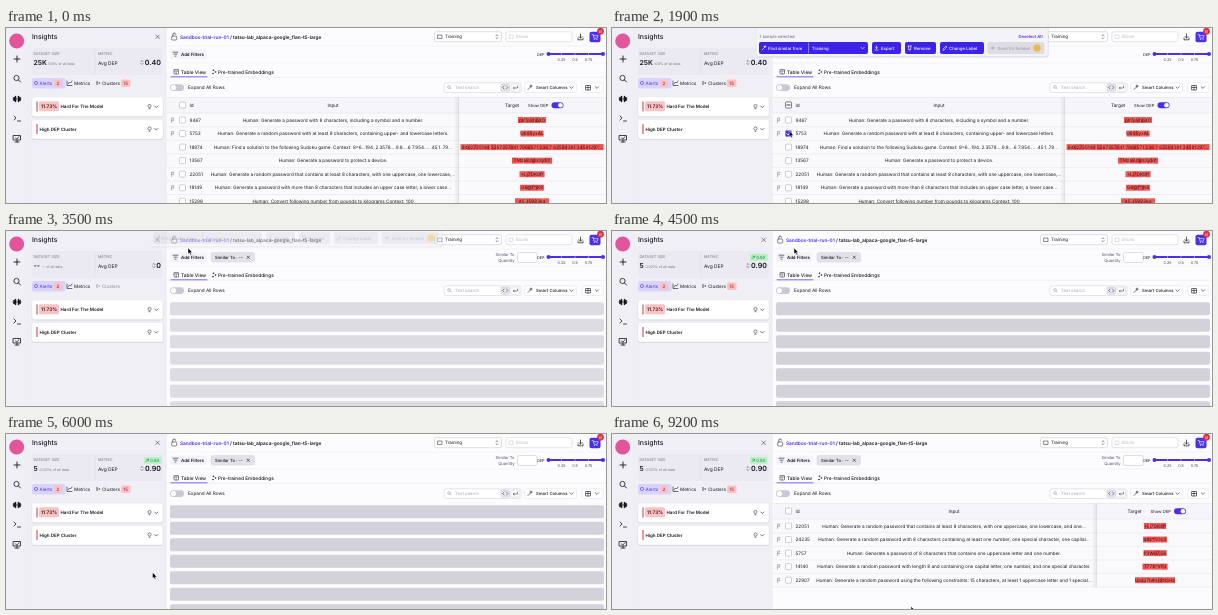
Animation of 600 by 175 pixels, one loop 9300 ms. Source, as an HTML page:

```html
<!DOCTYPE html>
<html lang="en">
<head>
<meta charset="utf-8">
<title>Insights</title>
<style>
html, body { margin: 0; width: 100%; height: 100%; overflow: hidden; background: #fff; }
svg { display: block; width: 600px; height: 175px; font-family: Inter, "Open Sans", sans-serif; text-rendering: geometricPrecision; }
text { white-space: pre; }
#toolbar { --action: #3d22ea; --on: #fff; --link: #4a36e8; }
#toolbar.busy { --action: #dddce4; --on: #a09faa; --link: #a09faa; }
</style>
</head>
<body>
<svg id="stage" viewBox="0 0 600 175"></svg>
<script>
const LOOP = 9300;
const INK = '#17171f', PURPLE = '#4a30ea', GREY = '#8b8a96', LINE = '#dddce4', PINK = '#f9c3c6';
const PANEL = '#f1eff6', PAGE = '#fcfbfe';

const rect = (x, y, w, h, fill, r = 0, stroke = 'none') =>
  `<rect x="${x}" y="${y}" width="${w}" height="${h}" rx="${r}" fill="${fill}" stroke="${stroke}" stroke-width=".5"/>`;
const circle = (x, y, r, fill, extra = '') => `<circle cx="${x}" cy="${y}" r="${r}" fill="${fill}" ${extra}/>`;
const path = (d, color = INK, w = .7, fill = 'none') =>
  `<path d="${d}" stroke="${color}" stroke-width="${w}" fill="${fill}" stroke-linecap="round" stroke-linejoin="round"/>`;
const text = (x, y, s, size = 4.65, fill = INK, weight = 400, anchor = 'start') =>
  `<text x="${x}" y="${y}" font-size="${size}" fill="${fill}" font-weight="${weight}" text-anchor="${anchor}">${s}</text>`;
const mid = (x, y, s, size, fill, weight) => text(x, y, s, size, fill, weight, 'middle');
const group = (id, body) => `<g id="${id}">${body}</g>`;
const chevron = (x, y) => path(`M${x - 1.6} ${y - .8}l1.6 1.6l1.6-1.6`, INK, .6);
const sorter = (x, y) => path(`M${x - 1} ${y - 1}l1-1l1 1M${x - 1} ${y + 1}l1 1l1-1`, INK, .5);
const toggle = (x, y, on) => rect(x, y, 12, 6, on ? PURPLE : '#cfced8', 3) + circle(x + (on ? 9 : 3), y + 3, 2.3, '#fff');
const checkbox = (x, y) => rect(x - 3, y - 3, 6, 6, '#fff', 1, '#9f9eac');

function sidebar() {
  return rect(0, 0, 22, 175, PANEL) + path('M22.5 0V175', '#dcdbe3', .5) +
    circle(10.7, 13, 7.5, '#e2559b') +
    path('M11 28v6M8 31h6', INK, .9) +
    circle(10.5, 50, 2.6, 'none', `stroke="${INK}" stroke-width=".8"`) + path('M12.5 52l2 2', INK, .9) +
    path('M9.5 68.5v5M12.5 68.5v5M8 69.5v3M14 69.5v3', INK, 1.5) + path('M7 71h8', INK, .8) +
    path('M8 88l2 2l-2 2M11.5 93h3', INK, .8) +
    path('M7.5 107.5h7v4.5h-7zM9 114h4M11 112v2M9.5 110l1.3 1l2.2-2.3', INK, .8);
}

function card(y, title, x) {
  return rect(25.7, y + .9, 131.6, 19.5, '#d9d7e1', 2) + rect(26, y, 131, 19.5, '#fff', 2, '#e4e3ea') +
    rect(30.5, y + 4.5, 1, 10, '#d3323c') +
    text(x, y + 11.4, title, 4.5, INK, 600) +
    circle(143.5, y + 9, 1.6, 'none', `stroke="${INK}" stroke-width=".5"`) +
    path(`M143 ${y + 11.7}h1`, INK, .6) + chevron(150.3, y + 9.8);
}

function insights() {
  return rect(23, 0, 137, 175, PANEL) + path('M160.2 0V175', '#dcdbe3', .5) +
    text(26, 11.4, 'Insights', 6.8, INK, 500) +
    path('M149.8 7l3.6 3.6M153.4 7l-3.6 3.6', INK, .5) +
    rect(26, 20, 131, 27, '#ebe9f1', 2) + path('M89 21V46', '#d9d7e1', .5) +
    text(27.5, 27.3, 'DATASET SIZE', 3.8, '#777683') + text(92, 27.3, 'METRIC', 3.8, '#777683') +
    text(92, 37, 'Avg DEP', 4.9) +
    rect(26, 50, 33.5, 10.5, '#d8d4fb', 2) + circle(30, 55, 1.6, 'none', `stroke="${PURPLE}" stroke-width=".6"`) +
    text(33.5, 56.8, 'Alerts', 4.6, PURPLE) + rect(48, 51.5, 8, 7.5, PINK, 1.5) + mid(52, 56.9, '2', 4.6, '#b3212d', 500) +
    path('M61 53v4.5h5M62 56l1.5-2l1 1l1.5-2', INK, .6) + text(68, 56.8, 'Metrics', 4.6) +
    card(69, 'Hard For The Model', 54.5) + rect(33, 73.3, 20, 10, PINK, 1.5) +
    mid(43, 80.3, '11.73%', 4.8, '#3b1115', 600) +
    card(91.5, 'High DEP Cluster', 33.5);
}

function stats(size, note, noteX, value, count) {
  const c = count ? INK : GREY;
  return text(27.5, 37.2, size, 6.9, INK, 600) + text(noteX, 36.8, note, 3.5, '#777683') +
    text(155, 37.2, value, 7.1, INK, 600, 'end') + sorter(152 - value.length * 4, 34.5) +
    [0, 1, 2].map(i => circle(91 + (i % 2) * 2.2, 54 + i, .7, c)).join('') + text(96, 56.8, 'Clusters', 4.6, c) +
    (count ? rect(115, 51.5, 9.5, 7.5, PINK, 1.5) + mid(119.7, 56.9, count, 4.6, '#b3212d', 500) : '');
}

function topBar() {
  return rect(160.5, 0, 440, 175, PAGE) + path('M161 18H600M161 35H600', '#ebeaf1', .5) +
    rect(165.7, 8, 5, 4, 'none', .8, INK) + path('M166.8 8v-1.5a1.4 1.4 0 0 1 2.8-.2', INK, .6) +
    text(174, 11, `<tspan fill="${PURPLE}">Sandbox-trial-run-01</tspan> / tatsu-lab_alpaca-google_flan-t5-large`, 4.8, INK, 600) +
    rect(428.5, 3.7, 67, 10, '#fff', 2, '#bdbcc8') + path('M432 7h4v3.5h-4z', INK, .5) + text(439, 10.4, 'Training', 4.5) + sorter(491, 8.7) +
    rect(500, 3.7, 66, 10, '#fff', 2, '#cbcad4') + path('M503.5 7h3.5v3.5h-3.5z', '#c1c0ca', .5) + text(509.5, 10.4, 'Slices', 4.5, '#b9b8c3') +
    path('M574.5 6v4M573 8.6l1.5 1.5l1.5-1.5M572 10v1.8h5V10', INK, .7) +
    rect(583.5, 3.8, 11, 10.5, PURPLE, 2) + path('M586 6.5h1.2l.8 3.7h3.3l.8-2.6h-4.6', '#fff', .6) +
    circle(588.3, 11.6, .5, '#fff') + circle(591, 11.6, .5, '#fff') +
    circle(594.5, 3.2, 3.4, '#e02f45') + mid(594.5, 4.5, '61', 3.5, '#fff') +
    rect(164, 21.5, 36.5, 9.5, '#f4f3f8', 2) +
    path('M167 24.2h5M168 26.2h3M169 28.2h1', INK, .6) + text(175, 28, 'Add Filters', 4.4, INK, 600) +
    path('M542.5 26H597', PURPLE, 1.8) + circle(542.5, 26, 2, PURPLE) + circle(597, 26, 2, PURPLE) +
    text(531, 27.5, 'DEP', 3.8) +
    [.25, .5, .75].map((v, i) => circle(555.5 + i * 13.5, 26, .6, '#fff') + mid(555.5 + i * 13.5, 32.6, v, 3.8, '#444352')).join('');
}

function tools() {
  return path('M161 49.2H600', LINE, .5) + path('M165 48.8H201', PURPLE, .7) +
    rect(168, 41.5, 4.5, 4.5, 'none', .4, INK) + path('M168 43h4.5M170.2 43v3', INK, .4) +
    text(175, 45.5, 'Table View', 4.8, INK, 500) +
    [[207.5, 42.3], [209.5, 44], [207, 45.5]].map(p => circle(...p, .8, INK)).join('') +
    text(212, 45.5, 'Pre-trained Embeddings', 4.8, INK, 500) +
    rect(164, 56.2, 14, 6.8, '#c9c8d3', 3.4) + circle(167.5, 59.6, 2.6, '#fff') + text(182, 61.2, 'Expand All Rows', 4.7) +
    rect(438, 54.8, 77, 9.7, '#fff', 2, '#cbcad4') +
    circle(443, 59, 1.4, 'none', `stroke="${GREY}" stroke-width=".5"`) + path('M444 60l1 1', GREY, .5) +
    text(449, 61.1, 'Text search', 4.4, '#a9a8b4') +
    rect(495, 56, 8.5, 7.2, '#e8e7f0', 1.2, '#bbbac6') + path('M498 58l-1.3 1.5l1.3 1.5M500.5 58l1.3 1.5l-1.3 1.5', INK, .5) +
    rect(505, 56, 8.5, 7.2, '#fff', 1.2, '#cbcad4') + path('M511.5 58v2h-4M508.3 59l-1 1l1 1', INK, .5) +
    rect(518.5, 54.8, 52, 9.7, '#fff', 2, LINE) + path('M522 61.5l3-3M525 57v2M524 58h2', INK, .6) +
    text(530, 61, 'Smart Columns', 4.3, INK, 500) + chevron(565.5, 59.6) +
    rect(576, 54.8, 21, 9.7, '#fff', 2, LINE) + path('M580 57.5h4.5v4.5h-4.5zM580 59.5h4.5M582 57.5v4.5', INK, .6) + chevron(591, 59.6);
}

// Rows are [id, input, output, output width, flagged].
function table(rows, split, inputX, outX, headX) {
  const end = Math.min(175, 85.3 + rows.length * 13.55);
  let s = rect(161, 69.5, 439, 15.5, '#f6f5fa') + rect(161, 85, 439, end - 85, '#faf9fc') +
    path('M161 69.5H600M161 85H600', LINE, .5) +
    checkbox(176.5, 77) + text(183.5, 78.8, 'Id', 4.7) + mid(inputX, 78.8, 'Input', 4.7) +
    text(headX, 78.8, 'Target', 4.7) + text(headX + 23, 78.5, 'Show DEP', 4.2) + toggle(headX + 46.5, 74.2, true);
  rows.forEach(([id, input, output, w, flag], i) => {
    const y = 92 + i * 13.55;
    if (flag) s += path(`M165.5 ${y + 2.5}v-4.5h2.5l-.8 1.2l.8 1.2h-2.3`, '#777683', .5);
    s += checkbox(176.5, y) + text(183.5, y + 1.7, id, 4.7) + mid(inputX, y + 1.7, input);
    const cells = Math.round(w / 6), cw = w / cells;
    for (let k = 0; k < cells; k++) {
      const tone = (k * 7 + i * 5) % 3;
      s += rect(outX - w / 2 + k * cw, y - 3, cw + .1, 6, ['#f0504e', '#f2605c', '#ea5a57'][tone]);
    }
    s += mid(outX, y + 1.7, output, 4.7, '#3a0c10') + path(`M161 ${y + 6.8}H600`, '#e3e2e9', .5);
  });
  return s + `<rect x="${split - 5}" y="69.5" width="5" height="${end - 69.5}" fill="url(#shade)"/>` +
    path(`M${split} 69.5V${end}`, '#cfced8', .5);
}

const ask = 'Human: Generate a ', askRandom = ask + 'random password ';
const allRows = [
  ['9467', ask + 'password with 8 characters, including a symbol and a number.', 'p#7p8hbdO', 28, 1],
  ['5753', askRandom + 'with at least 8 characters, containing upper- and lowercase letters.', 'U6S5yxAL', 23, 1],
  ['18974', 'Human: Find a solution to the following Sudoku game. Context: 8=6...194..2.3578....9.8....6 7.954.... .45.1..79...', '8462735194 5267357841 7968571 236 7 62594381 34581297...', 143, 0],
  ['13567', ask + 'password to protect a device.', 'TMza8J@s3y$Y', 40, 0],
  ['22051', askRandom + 'that contains at least 8 characters, with one uppercase, one lowercase,...', '+Lj7DK9f!', 25, 1],
  ['18149', ask + 'password with more than 8 characters that includes an upper case letter, a lower case...', 'G6@f^jK8', 24, 1],
  ['15298', 'Human: Convert following number from pounds to kilograms Context: 100', '45.35923kg', 34, 0]
];
const similarRows = [
  ['22051', askRandom + 'that contains at least 8 characters, with one uppercase, one lowercase, and one...', '+Lj7DK9f!', 22, 1],
  ['24235', askRandom + 'with 8 characters containing at least one number, one special character, one capital...', 'a8z*5Oc3', 24, 1],
  ['5757', ask + 'password of 8 characters that contains one uppercase letter and one number.', 'P3W87jS6', 23, 1],
  ['14140', askRandom + 'with length 8 and containing one capital letter, one number, and one special character.', 'T77$^VPJ', 25, 1],
  ['22907', askRandom + 'using the following constraints: 15 characters, at least 1 uppercase letter and 1 special...', 'UnsJ7h#+)dNSHz', 40, 1]
];

function similarFilter() {
  return rect(205, 21.5, 43.5, 9.5, '#e3e2ea', 2, '#d3d2dc') + text(209, 28, 'Similar To : --', 4.3, INK, 500) +
    path('M241 25l2.5 2.5M243.5 25L241 27.5', INK, .6) +
    text(508.5, 24.5, 'Similar To', 4.1, '#555463', 400, 'end') + text(508.5, 31, 'Quantity', 4.1, '#555463', 400, 'end') +
    rect(511.5, 21.5, 19.5, 10, '#fff', 1.5, '#bdbcc8');
}

function skeleton() {
  let s = rect(161, 66, 439, 109, PAGE);
  for (let i = 0; i < 7; i++) s += rect(164, 71.3 + i * 16.5, 434, 13, '#d3d2da', 2);
  return s;
}

function toolbar() {
  const on = 'var(--on)', link = 'var(--link)';
  const button = (x, w, label, icon) => rect(x, 14, w, 12, 'var(--action)', 2) + path(`M${x + 3} 18${icon}`, on, .6) +
    text(x + 9, 21.6, label, 4.3, on, 500);
  return rect(144.5, -5, 292, 34.5, '#d8d7e2', 3) + rect(144, -6, 292, 34.5, '#f4f3f8', 3, '#e0dfe8') +
    text(147.5, 10, '1 sample selected', 4.2, '#666573') + text(430.5, 10, 'Deselect All', 4.2, link, 600, 'end') +
    button(147, 109, 'Find similar from', 'm0 4l3-3m0-1.5v2m-1-1h2') + path('M196.5 15V25', on, .4) +
    text(200, 21.6, 'Training', 4.3, on, 500) + path('M249 19.3l1.6 1.6l1.6-1.6', on, .6) +
    button(260, 29, 'Export', 'm0 4h3m-1.5-4v2.6m-1-1l1 1l1-1') +
    button(293, 31, 'Remove', 'h3.4m-2.9 0l.3 4h1.8l.3-4') +
    button(328, 44, 'Change Label', 'm0 4v-1l3-3l1 1l-3 3z') +
    rect(375.5, 14, 57, 12, '#dddce3', 2) + path('M379 20h3M381 18.8l1.2 1.2l-1.2 1.2', GREY, .6) +
    text(385.5, 21.6, 'Send for Relabel', 4.2, '#9998a4') + circle(425, 20, 3.8, '#e9bd55');
}

const selection = rect(173.5, 102.6, 6, 6, PURPLE, 1) + path('M174.8 105.7l1.3 1.3l2.2-2.7', '#fff', .8) +
  rect(173.5, 74, 6, 6, '#fff', 1, INK) + path('M175 77h3', INK, .9);
const arrow = path('M0 0v6l1.4-1.2l1 2.2l1.1-.5l-1-2.1h1.9z', '#fff', .5, '#000');
const hand = path('M-.8 4V.6a.7.7 0 0 1 1.4 0V3l2.7.6q.8.3.6 1.2L3.4 7.4H0L-2.4 4.6q.1-1.1 1.6-.6z', '#000', .5, '#fff');

const stage = document.getElementById('stage');
stage.innerHTML = `<defs><linearGradient id="shade"><stop stop-color="#777" stop-opacity="0"/>
  <stop offset="1" stop-color="#777" stop-opacity=".14"/></linearGradient></defs>` +
  topBar() + tools() +
  group('all', table(allRows, 452.5, 327, 526, 499)) +
  group('checked', selection) + group('filter', similarFilter()) + group('loading', skeleton()) +
  group('similar', table(similarRows, 484.5, 342, 543, 515.5)) +
  sidebar() + insights() +
  group('before', stats('25K', '100% of all data', 42, '0.40', '15')) +
  group('pending', stats('--', '-- of all data', 36, '0', '')) +
  group('after', stats('5', '0.021% of all data', 33.5, '0.90', '15') + rect(138, 23, 17.5, 6.7, '#b9efc5', 1.5) +
    path('M140 27.7l2.4-2.4M140.9 25.2h1.5v1.5', '#218a43', .6) + text(144.3, 27.9, '0.50', 4.1, '#218a43', 500)) +
  group('toolbar', toolbar()) + group('arrow', arrow) + group('hand', hand);

const el = id => document.getElementById(id);
const show = (id, on) => el(id).style.display = on ? '' : 'none';
const clamp = v => Math.max(0, Math.min(1, v));
const ease = v => v * v * (3 - 2 * v);

// Cursor stops: [time, x, y]
const stops = [[0, 300, 182], [300, 300, 182], [1100, 176.5, 106], [1800, 176.5, 106], [2700, 196.5, 19],
  [3200, 196.5, 19], [3500, 182, 17], [4600, 182, 17], [5600, 146.5, 138.5], [6500, 146.5, 138.5],
  [6700, 155, 136.5], [6900, 155, 136.5], [7900, 299, 172.5], [LOOP, 299, 172.5]];

function cursorAt(t) {
  const i = stops.findIndex(s => s[0] > t);
  const [t0, x0, y0] = stops[i - 1], [t1, x1, y1] = stops[i];
  const k = ease((t - t0) / (t1 - t0));
  return [x0 + (x1 - x0) * k, y0 + (y1 - y0) * k];
}

function draw(t) {
  const asked = t >= 3300, counted = t >= 4300, loaded = t >= 6100;
  show('all', !asked);
  show('checked', t >= 1600 && !asked);
  show('filter', asked);
  show('loading', asked && !loaded);
  show('similar', loaded);
  show('before', !asked);
  show('pending', asked && !counted);
  show('after', counted);
  el('loading').style.opacity = .5 + .5 * clamp((t - 3200) / 600);

  // The bar drops in on selection, then greys out and slides away.
  const out = clamp((t - 3300) / 400), shown = clamp((t - 1600) / 300);
  show('toolbar', shown > 0 && out < 1);
  el('toolbar').classList.toggle('busy', asked);
  el('toolbar').setAttribute('transform', `translate(0 ${-30 * (1 - ease(shown)) - 26 * out})`);
  el('toolbar').style.opacity = shown * (1 - out);

  const pointing = t >= 1000 && t < 1900 || t >= 2600 && t < 3300;
  const place = `translate(${cursorAt(t).join(' ')})`;
  for (const id of ['arrow', 'hand']) el(id).setAttribute('transform', place);
  show('hand', pointing);
  show('arrow', !pointing);
}

const start = performance.now();
function tick() {
  const t = (performance.now() - start) % LOOP;
  draw(Math.floor(t / 100) * 100);
  requestAnimationFrame(tick);
}
tick();
</script>
</body>
</html>
```
